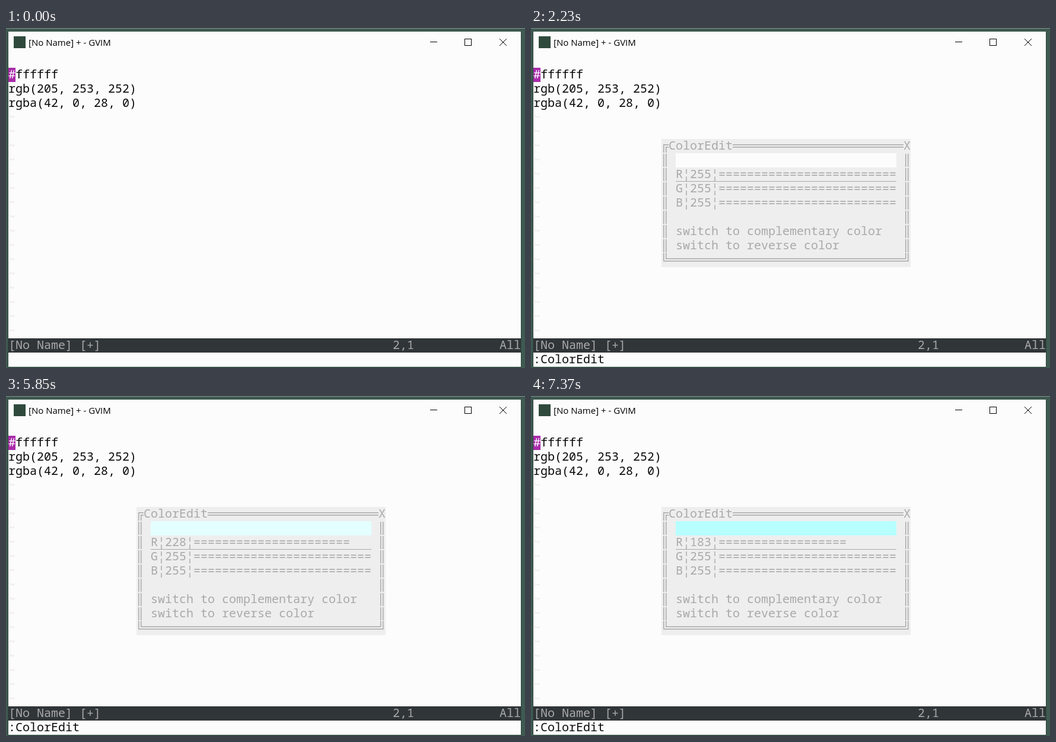
An HTML page with a canvas that plays this animation: 875x573 px, repeating every 8 s.

```html
<!DOCTYPE html>
<html lang="en">
<head>
<meta charset="utf-8">
<title>ColorEdit</title>
<style>
  html, body { margin: 0; width: 100%; height: 100%; overflow: hidden; background: #3f5a50; }
  canvas { display: block; width: 875px; height: 573px; }
</style>
</head>
<body>
<canvas id="stage" width="875" height="573"></canvas>
<script>
const ctx = document.getElementById('stage').getContext('2d');
const LOOP = 8000, CELL = 12, LINE = 24, LEFT = 4, TOP = 43;
const MONO = '20px "Noto Sans Mono", "DejaVu Sans Mono", monospace';
const PAPER = '#fcfcfc', INK = '#0a0a0a', PURPLE = '#a92ca9', GREY = '#a9a9a9', PANEL = '#eeeeee';
const STATUS_ROW = 20, COMMAND_ROW = 21, POPUP_COL = 18, POPUP_ROW = 6, POPUP_COLS = 35, POPUP_ROWS = 9;

// [start time, value of the red channel]
const RED_STEPS = [[0, 255], [4560, 254], [5090, 253]];
[5230, 5350, 5470, 5590, 5730, 5850, 5970, 6090, 6230, 6350]
  .forEach((t, i) => RED_STEPS.push([t, 248 - 4 * i]));
[6470, 6610, 6730, 6850, 6990, 7110, 7230, 7370]
  .forEach((t, i) => RED_STEPS.push([t, Math.round(212 - 3.625 * (i + 1))]));

const COMMANDS = [[0, ''], [530, ':'], [1160, ':C'], [1570, ':ColorEdit']];
const SELECTED = [[0, 0], [2880, 1], [3530, 2], [4050, 1], [4310, 0]];

const at = (steps, t) => steps.findLast(([start]) => start <= t)[1];
const during = (t, from, to) => t >= from && t < to;
const colX = col => LEFT + col * CELL;
const rowY = row => TOP + row * LINE;

function rect(x, y, w, h, color) {
  ctx.fillStyle = color;
  ctx.fillRect(x, y, w, h);
}

function cells(col, row, cols, rows, color) {
  rect(colX(col), rowY(row), cols * CELL, rows * LINE, color);
}

function text(str, col, row, color = INK) {
  ctx.font = MONO;
  ctx.fillStyle = color;
  ctx.fillText(str, colX(col), rowY(row) + 18);
}

function drawWindow() {
  rect(0, 0, 875, 573, '#3f5a50');
  rect(0, 0, 875, 1, '#7f918a');
  rect(3, 5, 866, 567, '#30483f');
  rect(4, 6, 864, 565, PAPER);
  rect(13, 14, 20, 20, '#2f4a3c');

  ctx.font = '15px "Open Sans", "Noto Sans", sans-serif';
  ctx.fillStyle = '#000';
  ctx.fillText('[No Name] + - GVIM', 38, 30);

  rect(715, 23, 12, 1, '#000');
  ctx.strokeStyle = '#000';
  ctx.lineWidth = 1;
  ctx.strokeRect(773.5, 18.5, 11, 11);
  ctx.beginPath();
  ctx.moveTo(832, 18); ctx.lineTo(844, 30);
  ctx.moveTo(844, 18); ctx.lineTo(832, 30);
  ctx.stroke();
}

function drawEditor(cursorOn) {
  if (cursorOn) cells(0, 1, 1, 1, PURPLE);
  text('#', 0, 1, cursorOn ? '#fff' : INK);
  text('ffffff', 1, 1);
  text('rgb(205, 253, 252)', 0, 2);
  text('rgba(42, 0, 28, 0)', 0, 3);
  for (let row = 4; row < STATUS_ROW; row++) text('~', 0, row, '#eae4e6');

  cells(0, STATUS_ROW, 72, 1, '#303538');
  text('[No Name] [+]', 0, STATUS_ROW, GREY);
  text('2,1', 54, STATUS_ROW, GREY);
  text('All', 69, STATUS_ROW, GREY);
}

function drawBorder(titled) {
  const x = colX(POPUP_COL), y = rowY(POPUP_ROW);
  const right = x + POPUP_COLS * CELL, bottom = y + (POPUP_ROWS - 1) * LINE;
  const across = (x1, x2, y1) => rect(x1, y1, x2 - x1, 1.5, GREY);
  const down = (x1, y1, y2) => rect(x1, y1, 1.5, y2 - y1, GREY);

  const lineStart = titled ? colX(POPUP_COL + 10) : x + 3;
  across(lineStart, right - CELL, y + 9);
  across(Math.max(lineStart, x + 7), right - CELL, y + 13);
  if (titled) {
    across(x + 3, x + CELL, y + 9);
    across(x + 7, x + CELL, y + 13);
  }
  down(x + 3, y + 9, y + 23);
  down(x + 7, y + 13, y + 23);

  for (let row = 1; row < POPUP_ROWS - 1; row++) {
    const top = y + row * LINE;
    for (const edge of [x, right - CELL])
      for (const dx of [3, 7]) down(edge + dx, top + 1, top + 23);
  }

  across(x + 7, right - 8, bottom + 9);
  across(x + 3, right - 3.5, bottom + 13);
  down(x + 3, bottom, bottom + 14);
  down(x + 7, bottom, bottom + 10);
  down(right - 9, bottom, bottom + 10);
  down(right - 5, bottom, bottom + 14);
}

function swatchColor(t, red) {
  if (t < 2880) return PAPER;
  return red > 252 ? '#feffff' : `rgb(${red}, 255, 255)`;
}

function drawPopup(t) {
  const red = at(RED_STEPS, t), titled = !during(t, 6350, 6470);
  const col = POPUP_COL + 2;
  cells(POPUP_COL, POPUP_ROW, POPUP_COLS, POPUP_ROWS, PANEL);
  drawBorder(titled);
  if (titled) {
    text('ColorEdit', POPUP_COL + 1, POPUP_ROW, GREY);
    text('X', POPUP_COL + POPUP_COLS - 1, POPUP_ROW, GREY);
  }
  cells(col, POPUP_ROW + 1, 31, 1, swatchColor(t, red));

  [['R', red], ['G', 255], ['B', 255]].forEach(([name, value], i) => {
    const bar = '='.repeat(Math.round(value / 255 * 25));
    text(`${name}¦${value}¦${bar}`, col, POPUP_ROW + 2 + i, GREY);
  });
  const selectedRow = POPUP_ROW + 2 + at(SELECTED, t);
  rect(colX(col), rowY(selectedRow) + 23, 31 * CELL, 1, GREY);

  text('switch to complementary color', col, POPUP_ROW + 6, GREY);
  text('switch to reverse color', col, POPUP_ROW + 7, GREY);
}

function draw(t) {
  const typing = during(t, 530, 2230);
  const hidden = typing || during(t, 2880, 3010) || during(t, 6350, 6470);
  const command = at(COMMANDS, t);
  drawWindow();
  drawEditor(!hidden);
  text(command, 0, COMMAND_ROW);
  if (typing) cells(command.length, COMMAND_ROW, 1, 1, PURPLE);
  if (t >= 2230) drawPopup(t);
}

const start = performance.now();
function tick() {
  draw((performance.now() - start) % LOOP);
  requestAnimationFrame(tick);
}
tick();
</script>
</body>
</html>
```
